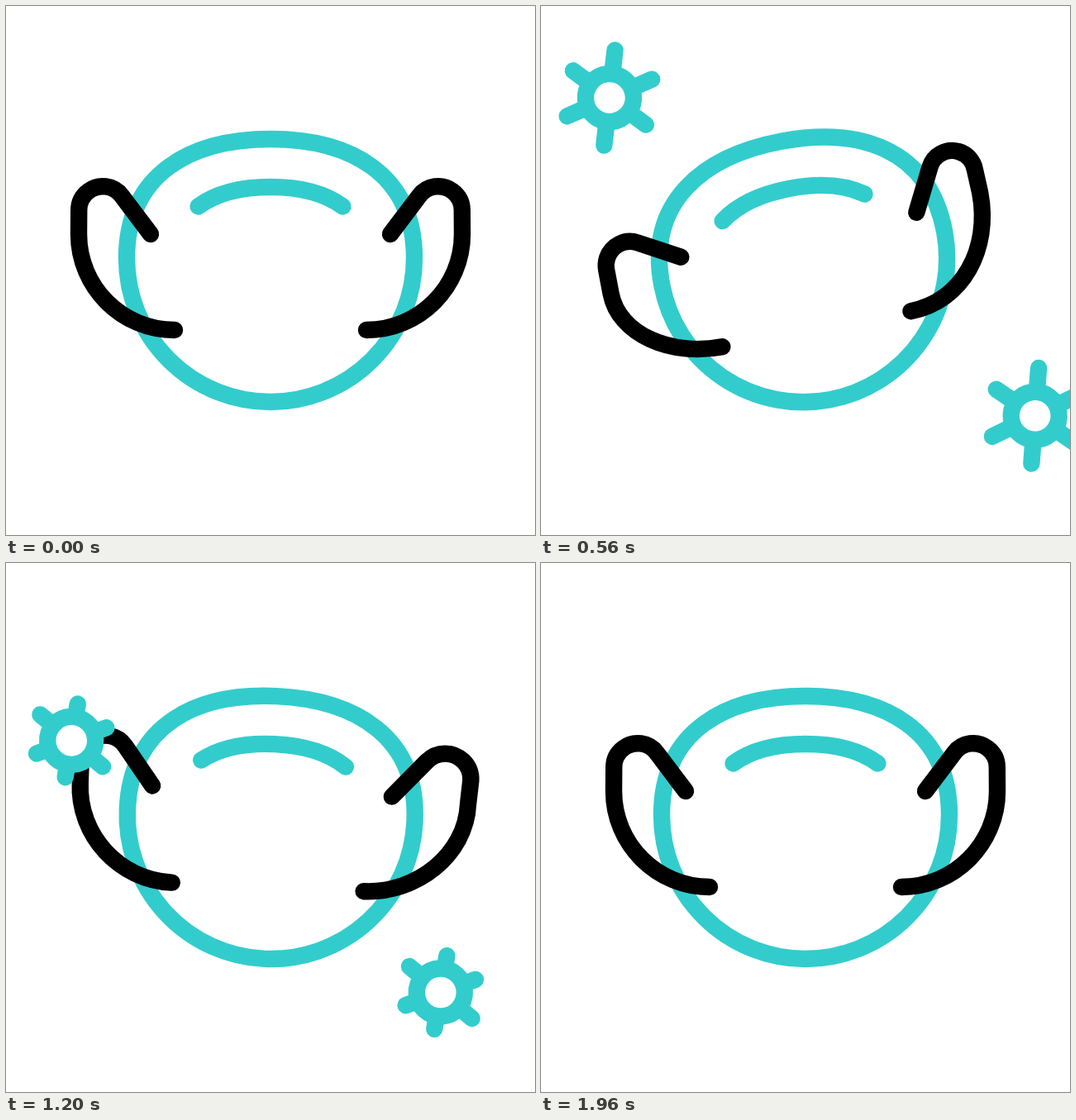
These frames come from a looping animation (640x640 px, 2.04 s). An HTML page with a canvas:

```html
<!DOCTYPE html>
<html lang="en">
<head>
<meta charset="utf-8">
<title>Face mask</title>
<style>
  html, body { margin: 0; width: 100%; height: 100%; overflow: hidden; background: #fff; }
  canvas { display: block; width: 100vw; height: 100vh; }
</style>
</head>
<body>
<canvas id="stage" width="640" height="640"></canvas>
<script>
const ctx = document.getElementById('stage').getContext('2d');
const LOOP = 2040, STEP = 40;
const TEAL = '#33cccc', BLACK = '#000';
const RAD = Math.PI / 180;

// Smooth 0..1 progress between times a and b
function ease(t, a, b) {
  const f = Math.min(1, Math.max(0, (t - a) / (b - a)));
  return (1 - Math.cos(Math.PI * f)) / 2;
}

// Accelerating departure, reaching 1 at 1360 ms
const leave = (t, start, power) => (Math.max(0, t - start) / (1360 - start)) ** power;

// Keys are [time, value, value, ...]
function track(keys, t) {
  let i = 0;
  while (i < keys.length - 2 && t > keys[i + 1][0]) i++;
  const a = keys[i], b = keys[i + 1], f = ease(t, a[0], b[0]);
  return a.slice(1).map((v, k) => v + (b[k + 1] - v) * f);
}

const TILT = [[80, 0], [400, -16.2], [960, 12.9], [1400, -5.1], [1940, 0]];

// Loop offset x, y and radius; x grows toward the mask
const LEFT_EAR = [
  [80, 0, 0, 28.8], [400, -4, 28, 29], [720, -5, 27, 29], [1040, 3, -3, 29],
  [1360, -4, 3, 29.5], [1640, -7, 2.5, 29.3], [1940, 0, 0, 28.8]
];
const RIGHT_EAR = [
  [80, 0, 0, 28.8], [400, 7, -9, 28], [720, 7, -9, 28], [1040, -12, 8, 33],
  [1360, 1, 2, 29], [1640, 3, 0, 29], [1940, 0, 0, 28.8]
];

function body() {
  ctx.strokeStyle = TEAL;
  ctx.beginPath();
  ctx.arc(320, 305, 174, 0, Math.PI);
  ctx.bezierCurveTo(146, 202, 225, 161, 320, 161);
  ctx.bezierCurveTo(415, 161, 494, 202, 494, 305);
  ctx.closePath();
  ctx.stroke();

  ctx.beginPath();
  ctx.moveTo(232.5, 242.5);
  ctx.bezierCurveTo(255, 226, 285, 219, 320, 219);
  ctx.bezierCurveTo(355, 219, 385, 226, 407.5, 242.5);
  ctx.stroke();
}

function ear([dx, dy, r]) {
  const ax = 175, ay = 276, cx = 117 + dx, cy = 247 + dy;
  const tangent = Math.atan2(ay - cy, ax - cx) - Math.acos(r / Math.hypot(ax - cx, ay - cy));
  ctx.strokeStyle = BLACK;
  ctx.beginPath();
  ctx.moveTo(ax, ay);
  ctx.arc(cx, cy, r, tangent, Math.PI, true);
  ctx.lineTo(88 + dx, 276 + dy);
  ctx.bezierCurveTo(88 + dx, 340 + dy / 2, 140, 392, 204, 392);
  ctx.stroke();
}

function mask(t) {
  ctx.save();
  ctx.translate(320, 320);
  ctx.rotate(track(TILT, t)[0] * RAD);
  ctx.translate(-320, -320);
  body();
  ear(track(LEFT_EAR, t));
  ctx.translate(640, 0);
  ctx.scale(-1, 1);
  ear(track(RIGHT_EAR, t));
  ctx.restore();
}

// Spike pairs shorten on arrival and lengthen on departure, one pair after another
function spikeLength(pair, t, lag) {
  const shrink = [548, 456, 428][pair] + lag;
  const grow = [1242, 1192, 1045][pair];
  return 45 + 13 * (1 - ease(t, shrink, shrink + 400) + ease(t, grow, grow + 400));
}

function virus(t, x, y, arrival, lag) {
  const spin = -17.2 * (1 - arrival) - 6.6 * leave(t, 900, 2);
  ctx.save();
  ctx.translate(x, y);
  ctx.rotate(spin * RAD);
  ctx.strokeStyle = TEAL;
  ctx.fillStyle = '#fff';
  for (let i = 0; i < 6; i++) {
    const a = (-77.5 + 60 * i) * RAD, len = spikeLength(i % 3, t, lag);
    ctx.beginPath();
    ctx.moveTo(30 * Math.cos(a), 30 * Math.sin(a));
    ctx.lineTo(len * Math.cos(a), len * Math.sin(a));
    ctx.stroke();
  }
  ctx.beginPath();
  ctx.arc(0, 0, 29, 0, 2 * Math.PI);
  ctx.fill();
  ctx.stroke();
  ctx.restore();
}

function draw(t) {
  ctx.fillStyle = '#fff';
  ctx.fillRect(0, 0, 640, 640);
  ctx.lineWidth = 20.4;
  ctx.lineCap = ctx.lineJoin = 'round';
  mask(t);

  const a = ease(t, 140, 840), b = ease(t, 200, 900);
  virus(t, -120 + 310 * a - 230 * leave(t, 837, 2), 56 + 84 * a + 176 * leave(t, 900, 2), a, 0);
  virus(t, 756 - 303 * b + 157.5 * leave(t, 860, 2), 518 - 42.5 * b + 132 * leave(t, 838, 3), b, 55);
}

const start = performance.now();
function tick() {
  const t = (performance.now() - start) % LOOP;
  draw(Math.floor(t / STEP) * STEP);
  requestAnimationFrame(tick);
}
tick();
</script>
</body>
</html>
```
